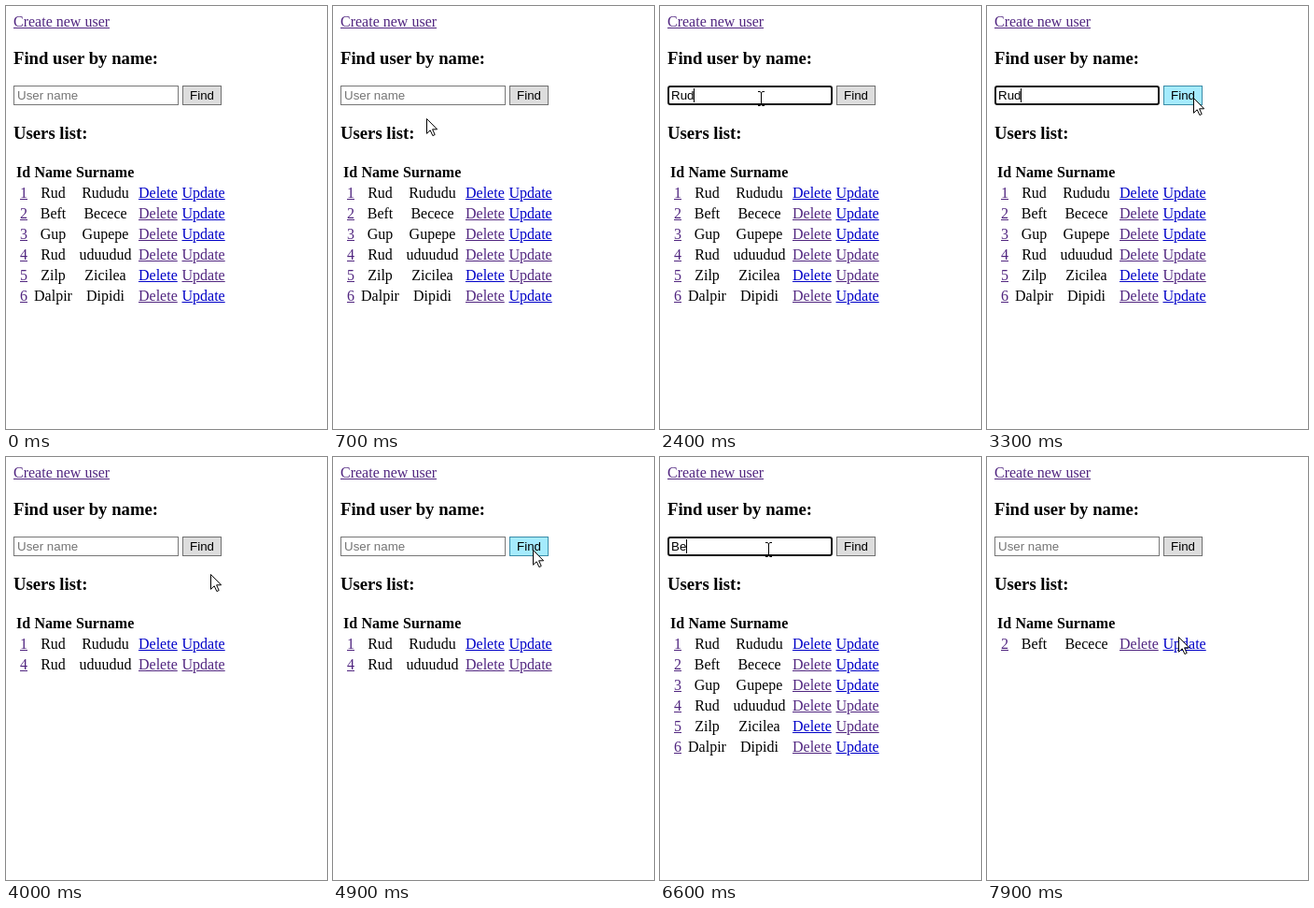
An HTML page for the animation above (8000 ms loop, 344x452 px).

```html
<!DOCTYPE html>
<html lang="en">
<head>
<meta charset="utf-8">
<title>Users list</title>
<style>
html, body { margin: 0; width: 100%; height: 100%; overflow: hidden; background: #fff; }
#stage { position: relative; width: 344px; height: 452px; overflow: hidden;
  font: 16px/18px "Liberation Serif", "Times New Roman", serif; color: #000; white-space: nowrap; }
#stage > *, .row > * { position: absolute; }
h3 { left: 8px; margin: 0; font-size: 18.72px; line-height: 21px; }
a { color: #512680; text-decoration: underline; }
a.new { color: #0000c8; }

.field, .find { box-sizing: border-box; top: 85px; height: 21px;
  font: 13.333px/19px "Liberation Sans", Arial, sans-serif; }
.field { left: 8px; width: 177px; border: 1px solid #767676; padding-left: 3px; color: #757575; }
.field.hover { border-color: #3f8fac; }
.field.focus { border: 2px solid #101010; border-radius: 3px; padding-left: 2px; line-height: 17px; }
.field.filled { color: #000; }
.caret { position: absolute; top: 1px; width: 1px; height: 15px; background: #000; }
.field.focus:not(.filled) .caret { left: 2px; }
.find { left: 189px; width: 42px; border: 1px solid #707070; background: #ddd; text-align: center; }
.find.hover { border-color: #3b8ca8; background: #a5ebfd; }

.head { top: 169px; font-weight: bold; }
.list { top: 191px; left: 0; }
.row { position: relative; width: 344px; height: 22px; }
.row > :nth-child(1) { left: 15px; }
.row > :nth-child(2) { left: 30px; width: 41px; text-align: center; }
.row > :nth-child(3) { left: 75px; width: 63px; text-align: center; }
.row > :nth-child(4) { left: 142px; }
.row > :nth-child(5) { left: 188.5px; }
#pointer { left: 0; top: 0; width: 1px; height: 1px; overflow: visible; }
[hidden] { display: none; }
</style>
</head>
<body>
<div id="stage">
  <a style="left:8px;top:8px">Create new user</a>
  <h3 style="top:45px">Find user by name:</h3>
  <div class="field"><span class="text"></span><i class="caret"></i></div>
  <div class="find">Find</div>
  <h3 style="top:125px">Users list:</h3>
  <span class="head" style="left:11px">Id</span>
  <span class="head" style="left:30.5px">Name</span>
  <span class="head" style="left:75px">Surname</span>
  <div class="list"></div>
  <svg id="pointer">
    <path class="arrow" d="M.5 .5V16.3L4.2 12.8L6.9 18.6L9.2 17.5L6.6 11.8H11.6Z" fill="#fff" stroke="#000"/>
    <path class="beam" d="M-3 -7.5H-1L.5 -6.5L2 -7.5H4M.5 -6.5V6.5M-3 7.5H-1L.5 6.5L2 7.5H4" fill="none" stroke="#000"/>
  </svg>
</div>
<script>
const LOOP = 8000, STEP = 100;
const $ = s => document.querySelector(s);

// name, surname, then whether the Delete and Update links are unvisited
const users = [
  ["Rud", "Rududu", 1, 1],
  ["Beft", "Becece", 0, 1],
  ["Gup", "Gupepe", 0, 1],
  ["Rud", "uduudud", 0, 0],
  ["Zilp", "Zicilea", 1, 0],
  ["Dalpir", "Dipidi", 0, 1]
];

// time, x, y
const path = [
  [100, 320, 389], [300, 250, 290], [500, 160, 180], [700, 100, 120], [900, 70, 99],
  [1400, 69, 98], [2300, 69, 98], [2700, 225, 100], [3300, 221, 98], [3900, 221, 98],
  [4200, 215, 180], [4400, 235, 180], [4600, 252, 150], [4900, 214, 99],
  [5200, 214, 99], [5500, 170, 100], [5800, 127, 101], [6200, 116, 99],
  [7100, 116, 99], [7400, 214, 99], [7600, 218, 99], [7700, 254, 140],
  [7800, 232, 178], [7900, 205, 192]
];

// each search: focus, key presses, then the click and the page that follows
const searches = [
  { focus: 1600, keys: [1800, 2000, 2200], word: "Rud", click: 3800, from: 3900, to: 5200 },
  { focus: 6200, keys: [6400, 6600, 6800, 7000], word: "Beft", click: 7600, from: 7600, to: LOOP }
];

const link = (text, fresh) => `<a${fresh ? ' class="new"' : ""}>${text}</a>`;
$(".list").innerHTML = users.map(([name, surname, del, upd], i) =>
  `<div class="row">${link(i + 1)}<span>${name}</span><span>${surname}</span>` +
  `${link("Delete", del)}${link("Update", upd)}</div>`).join("");

const rows = [...document.querySelectorAll(".row")];
const field = $(".field"), text = $(".text"), caret = $(".caret"), find = $(".find");
const pointer = $("#pointer"), arrow = $(".arrow"), beam = $(".beam");

function pointerAt(t) {
  const n = path.findIndex(p => p[0] > t);
  if (n < 0) return path[path.length - 1].slice(1);
  const [t0, x0, y0] = path[Math.max(n - 1, 0)], [t1, x1, y1] = path[n];
  const k = t1 > t0 ? (t - t0) / (t1 - t0) : 0;
  return [x0 + (x1 - x0) * k, y0 + (y1 - y0) * k].map(Math.round);
}

const inside = (x, y, left, right) => x >= left && x < right && y >= 85 && y < 106;

function draw(t) {
  const [x, y] = pointerAt(t);
  const shown = t >= path[0][0];
  const overField = shown && inside(x, y, 8, 185);
  pointer.style.visibility = shown ? "visible" : "hidden";
  pointer.style.transform = `translate(${x}px, ${y}px)`;
  arrow.style.display = overField ? "none" : "";
  beam.style.display = overField ? "" : "none";
  find.classList.toggle("hover", shown && inside(x, y, 189, 231));

  const active = searches.find(s => t >= s.focus && t < s.click);
  const pressed = active ? active.keys.filter(k => k <= t) : [];
  const typed = active ? active.word.slice(0, pressed.length) : "";
  field.classList.toggle("hover", overField);
  field.classList.toggle("focus", !!active);
  field.classList.toggle("filled", !!typed);
  text.textContent = typed || "User name";
  const since = active ? t - (pressed.length ? pressed[pressed.length - 1] : active.focus) : 0;
  caret.hidden = !active || since % 1000 >= 500;

  const result = searches.find(s => t >= s.from && t < s.to);
  rows.forEach((row, i) => row.hidden = !!result && users[i][0] !== result.word);
}

function tick() {
  draw(Math.floor(performance.now() % LOOP / STEP) * STEP);
  requestAnimationFrame(tick);
}
tick();
</script>
</body>
</html>
```
